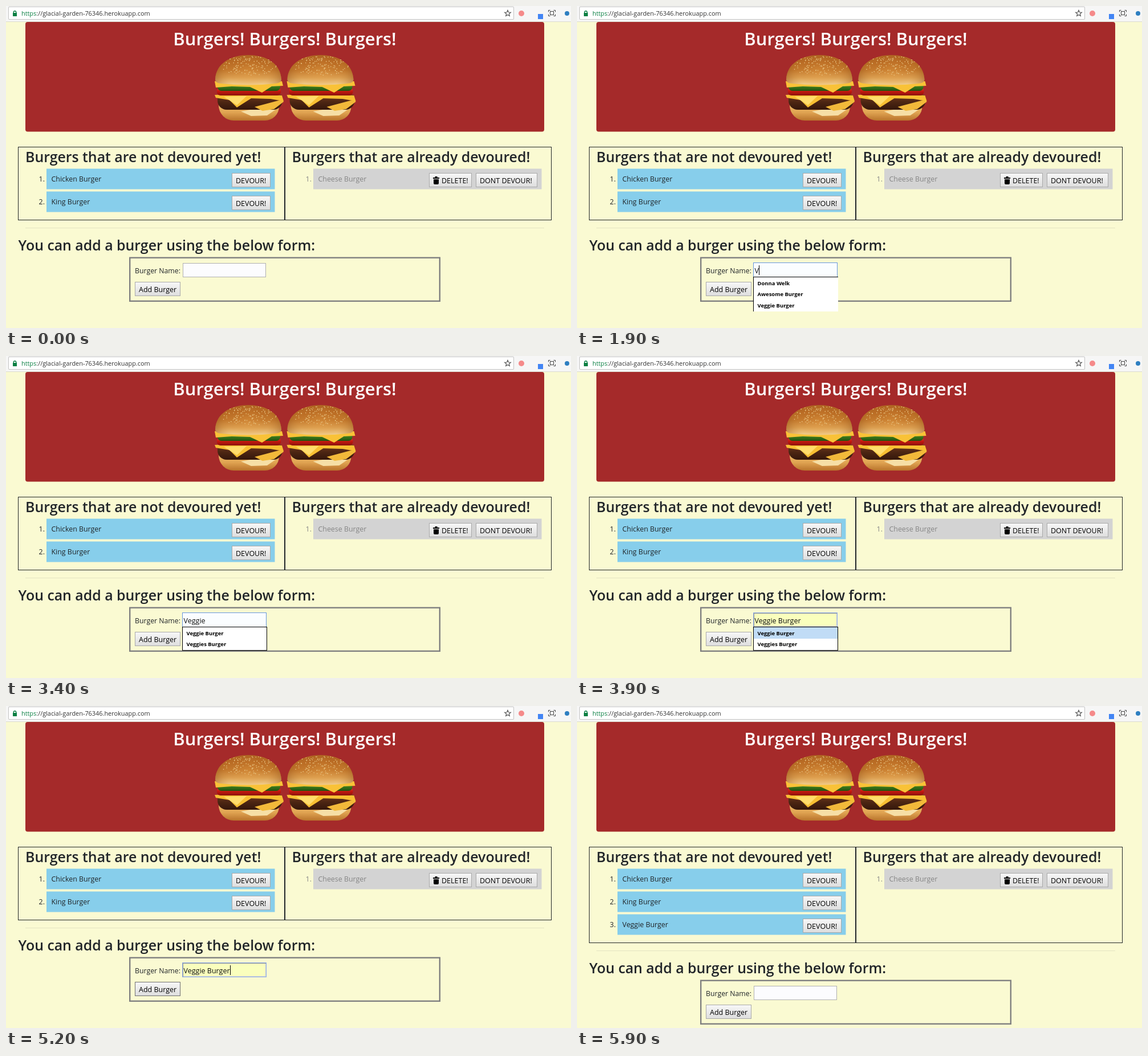
Animation of 991 by 565 pixels, one loop 8 s. Source, as an HTML page with a canvas:

```html
<!DOCTYPE html>
<html lang="en">
<head>
<meta charset="utf-8">
<title>Burger list</title>
<style>
  html, body { margin: 0; width: 100%; height: 100%; overflow: hidden; background: #fafad2; }
  canvas { display: block; width: 991px; height: 565px; }
</style>
</head>
<body>
<canvas id="stage" width="991" height="565"></canvas>
<script>
const ctx = document.getElementById('stage').getContext('2d');
const LOOP = 8000;
const INK = '#212529';
const FONT = '"Open Sans", "Noto Sans", sans-serif';
const HEADING = 24.87;

const OLD_LIST = ['Donna Welk', 'Awesome Burger', 'Veggie Burger', 'Jo Halveren', 'melt0021'];
const V_LIST = ['Veggie Burger', 'Veggies Burger', 'Vegan Burger'];
const VEGGIES = V_LIST.slice(0, 2);

// Each step changes only the listed parts of the state.
const steps = [
  [0, { text: '', focus: false, caret: false, list: null, open: '', hover: false, filled: false, button: '', added: false }],
  [500, { focus: true, caret: true, list: OLD_LIST, open: 'scroll' }],
  [900, { caret: false }],
  [1400, { caret: true }],
  [1900, { text: 'V', list: OLD_LIST.slice(0, 3), open: 'cut' }],
  [2000, { list: V_LIST, open: 'full' }],
  [2100, { text: 'Ve' }],
  [2400, { text: 'Veg' }],
  [2600, { text: 'Vegg' }],
  [2700, { text: 'Veggi', list: VEGGIES }],
  [2900, { text: 'Veggie' }],
  [3400, { caret: false }],
  [3800, { hover: true }],
  [3900, { text: 'Veggie Burger', filled: true }],
  [4200, { list: null, caret: true }],
  [4800, { caret: false }],
  [5100, { button: 'hover' }],
  [5200, { caret: true }],
  [5500, { focus: false, caret: false, button: 'down' }],
  [5600, { button: 'hover' }],
  [5900, { text: '', filled: false, button: '', added: true }]
];

function stateAt(t) {
  const state = {};
  for (const [start, change] of steps) if (t >= start) Object.assign(state, change);
  return state;
}

function rect(x, y, w, h, color) {
  ctx.fillStyle = color;
  ctx.fillRect(x, y, w, h);
}

function frame(x, y, w, h, color, width = 1) {
  ctx.strokeStyle = color;
  ctx.lineWidth = width;
  ctx.strokeRect(x + width / 2, y + width / 2, w - width, h - width);
}

function label(text, x, y, size, color = INK, weight = 400, align = 'left') {
  ctx.font = `${weight} ${size}px ${FONT}`;
  ctx.textAlign = align;
  ctx.fillStyle = color;
  ctx.fillText(text, x, y);
}

function shape(points, color) {
  ctx.beginPath();
  points.forEach(([x, y]) => ctx.lineTo(x, y));
  ctx.closePath();
  ctx.fillStyle = color;
  ctx.fill();
}

function rounded(x, y, w, h, r, color) {
  ctx.beginPath();
  ctx.roundRect(x, y, w, h, r);
  ctx.fillStyle = color;
  ctx.fill();
}

function dot(x, y, r, color) {
  ctx.beginPath();
  ctx.arc(x, y, r, 0, Math.PI * 2);
  ctx.fillStyle = color;
  ctx.fill();
}

function addStops(gradient, colors) {
  colors.forEach((c, i) => gradient.addColorStop(i / (colors.length - 1), c));
  return gradient;
}

function fade(top, bottom, ...colors) {
  return addStops(ctx.createLinearGradient(0, top, 0, bottom), colors);
}

function glow(x, y, r, ...colors) {
  return addStops(ctx.createRadialGradient(x, y, 1, x, y, r), colors);
}

function button(text, x, y, w, mode = '', indent = 7) {
  const h = 25;
  const tones = mode === 'down' ? ['#d6d6d6', '#eeeeee'] : ['#f8f8f8', '#dddddd'];
  rect(x, y, w, h, fade(y, y + h, ...tones));
  frame(x, y, w, h, mode ? '#707070' : '#a9a9a9');
  label(text, x + indent, y + 17.5, 12.5, '#000');
}

function toolbar() {
  rect(0, 0, 991, 27, '#f6f6f6');
  rect(0, 27, 991, 1, '#dcdcd0');
  rounded(4, 1, 887, 23, 2, '#c4c4c4');
  rounded(5, 2, 885, 21, 1, '#fff');

  rect(12, 12, 7, 6, '#0b8043');
  ctx.strokeStyle = '#0b8043';
  ctx.lineWidth = 1.4;
  ctx.beginPath();
  ctx.arc(15.5, 11, 2.2, Math.PI, 0);
  ctx.lineTo(17.7, 13);
  ctx.moveTo(13.3, 11);
  ctx.lineTo(13.3, 13);
  ctx.stroke();
  label('https', 27, 17, 10.9, '#0b8043');
  const offset = ctx.measureText('https').width;
  label('://glacial-garden-76346.herokuapp.com', 27 + offset, 17, 10.9, '#333');

  ctx.beginPath();
  for (let i = 0; i < 10; i++) {
    const a = -Math.PI / 2 + i * Math.PI / 5;
    const r = i % 2 ? 2.5 : 5.6;
    ctx.lineTo(880 + r * Math.cos(a), 13 + r * Math.sin(a));
  }
  ctx.closePath();
  ctx.strokeStyle = '#555';
  ctx.lineWidth = 1.2;
  ctx.stroke();

  dot(904, 13, 5, '#f58a8a');
  rect(933, 14, 9, 9, '#4285f4');
  frame(954, 9, 7, 7, '#444');
  for (const sx of [-1, 1]) {
    for (const sy of [-1, 1]) {
      const x = 957.5 + sx * 6, y = 12.5 + sy * 5;
      ctx.beginPath();
      ctx.moveTo(x - sx * 3, y);
      ctx.lineTo(x, y);
      ctx.lineTo(x, y - sy * 3);
      ctx.stroke();
    }
  }
  dot(984, 13, 4, '#2f7fc1');
}

function bottomHalf() {
  rounded(7, 84, 106, 32, [6, 6, 28, 30], fade(86, 116, '#e9b968', '#e2a654', '#b9742c'));
  shape([[46, 100], [74, 95], [108, 96], [92, 107], [64, 108]], '#f6dfa6');
  rounded(5, 70, 114, 27, [6, 6, 16, 16], fade(70, 97, '#70391d', '#4d2613', '#34170b'));
  shape([[70, 92], [119, 79], [121, 83], [104, 96], [84, 99]], '#f2b93a');
  shape([[0, 71], [60, 69], [118, 72], [121, 82], [98, 78], [64, 77], [39, 93], [26, 80], [2, 76]], '#f8bf33');
  shape([[16, 74], [56, 73], [39, 89]], '#ffdc6c');
}

function filling() {
  rounded(4, 58, 112, 14, 6, fade(58, 72, '#e23a22', '#c4170f', '#8a120c'));
  rounded(5, 49, 110, 15, 7, fade(49, 64, '#6aa031', '#3b7a1c', '#24510f'));
  shape([[0, 47], [60, 50], [118, 47], [120, 55], [100, 56], [83, 67], [62, 57], [30, 56], [2, 58]], '#f9c237');
}

function topBun() {
  ctx.beginPath();
  ctx.moveTo(1, 44);
  ctx.bezierCurveTo(2, 16, 28, 1, 59, 1);
  ctx.bezierCurveTo(92, 1, 116, 17, 117, 44);
  ctx.quadraticCurveTo(117, 50, 106, 51);
  ctx.quadraticCurveTo(60, 56, 11, 51);
  ctx.quadraticCurveTo(1, 50, 1, 44);
  ctx.fillStyle = fade(1, 54, '#a85c1c', '#b4651f', '#c0752a', '#d99d50', '#f4d69a');
  ctx.fill();
  ctx.clip();
  rect(0, 0, 118, 56, glow(59, 34, 64, 'rgba(235,165,75,.35)', 'rgba(235,165,75,.1)', 'rgba(120,58,12,.45)'));

  let seed = 7;
  const random = () => (seed = seed * 16807 % 2147483647) / 2147483647;
  for (let i = 0; i < 130; i++) {
    const a = random() * Math.PI * 2;
    const r = Math.sqrt(random());
    dot(59 + 51 * r * Math.cos(a), 20 + 17 * r * Math.sin(a), 0.8, '#eac888');
  }
}

function burger(x, y) {
  ctx.save();
  ctx.translate(x, y);
  bottomHalf();
  filling();
  topBun();
  ctx.restore();
}

function banner() {
  rounded(34, 28, 910, 192.5, 4, '#a52a2a');
  label('Burgers! Burgers! Burgers!', 489, 69, 30.95, '#fff', 600, 'center');
  burger(366, 85);
  burger(492.5, 85);
}

function row(i, x, name, back, ink) {
  const y = 286 + 40 * i;
  rect(x, y - 0.5, 400.5, 36, back);
  label(i + 1 + '.', x - 3, y + 22, 12.4, ink, 400, 'right');
  label(name, x + 8.5, y + 22, 12.4, ink);
}

function bin(x, y) {
  rect(x, y + 2, 11, 2, '#000');
  rect(x + 3.5, y, 4, 2, '#000');
  rounded(x + 1, y + 5, 9, 9, [0, 0, 2, 2], '#000');
}

function lists(added) {
  const names = ['Chicken Burger', 'King Burger'];
  if (added) names.push('Veggie Burger');
  const h = 49 + 40 * names.length;
  frame(21, 247, 468, h, INK);
  frame(489, 247, 468, h, INK);
  label('Burgers that are not devoured yet!', 34, 273.5, HEADING, INK, 600);
  label('Burgers that are already devoured!', 501.5, 273.5, HEADING, INK, 600);
  names.forEach((name, i) => {
    row(i, 71, name, '#87ceeb', INK);
    button('DEVOUR!', 396, 293 + 40 * i, 68);
  });
  row(0, 539, 'Cheese Burger', '#d3d3d3', '#868686');
  button('DELETE!', 742, 293, 75, '', 22);
  bin(749, 299);
  button('DONT DEVOUR!', 824, 293, 108);
}

function field(s) {
  const fill = s.filled ? '#faffbd' : s.focus ? '#fafdff' : '#fcfcfe';
  rect(310, 451, 146, 25, fill);
  if (s.focus) {
    rect(309, 450, 148, 26, fill);
    frame(309, 450, 148, 26, s.filled ? '#93b0e6' : '#6796dc');
  }
  if (s.filled) {
    frame(310, 451, 146, 24, '#c3cbdc');
    rect(310, 451, 146, 1, '#8a8f9c');
    rect(310, 451, 1, 24, '#8a8f9c');
  } else if (!s.focus) {
    frame(310, 451, 146, 25, '#b0b0b0');
  }
  label(s.text, 311.5, 468.5, 12.5, '#111');
  if (s.caret) rect(Math.round(312 + ctx.measureText(s.text).width), 455, 1, 17, '#000');
}

function scrollbar() {
  rect(457, 476, 14, 87, '#f1f1f1');
  rect(458, 490, 12, 44, '#c6c6c6');
  ctx.strokeStyle = '#505050';
  ctx.lineWidth = 1.5;
  for (const [y, d] of [[485.5, -3], [555, 3]]) {
    ctx.beginPath();
    ctx.moveTo(461, y);
    ctx.lineTo(464, y + d);
    ctx.lineTo(467, y);
    ctx.stroke();
  }
}

function dropdown(s) {
  const scroll = s.open === 'scroll';
  const w = scroll ? 163 : 149;
  const h = scroll ? 89 : s.open === 'cut' ? 61 : 2 + Math.round(19.75 * s.list.length);
  ctx.save();
  ctx.beginPath();
  ctx.rect(309, 475, w, h);
  ctx.clip();
  rect(309, 475, w, h, '#fff');
  if (s.hover) rect(310, 476, w - 2, 20, '#c1dcf6');
  s.list.forEach((name, i) => label(name, 316.5, 489.5 + 19.75 * i, 9.45, '#000', 700));
  if (scroll) scrollbar();
  if (s.open === 'cut') {
    rect(309, 475, w, 1, '#000');
    rect(309, 475, 1, h, '#000');
  } else {
    frame(309, 475, w, h, '#000');
  }
  ctx.restore();
}

function form(s) {
  ctx.save();
  if (s.added) ctx.translate(0, 40);
  rect(34, 389, 910, 1, '#e4e4c2');
  label('You can add a burger using the below form:', 21.5, 428.5, HEADING, INK, 600);
  frame(216, 440.5, 546, 78.5, '#808080', 2.4);
  label('Burger Name:', 226, 468.5, 12.3);
  field(s);
  button('Add Burger', 226, 484, 80, s.button);
  if (s.list) dropdown(s);
  ctx.restore();
}

function draw() {
  const state = stateAt(performance.now() % LOOP);
  rect(0, 0, 991, 565, '#fafad2');
  toolbar();
  banner();
  lists(state.added);
  form(state);
  requestAnimationFrame(draw);
}

draw();
</script>
</body>
</html>
```
